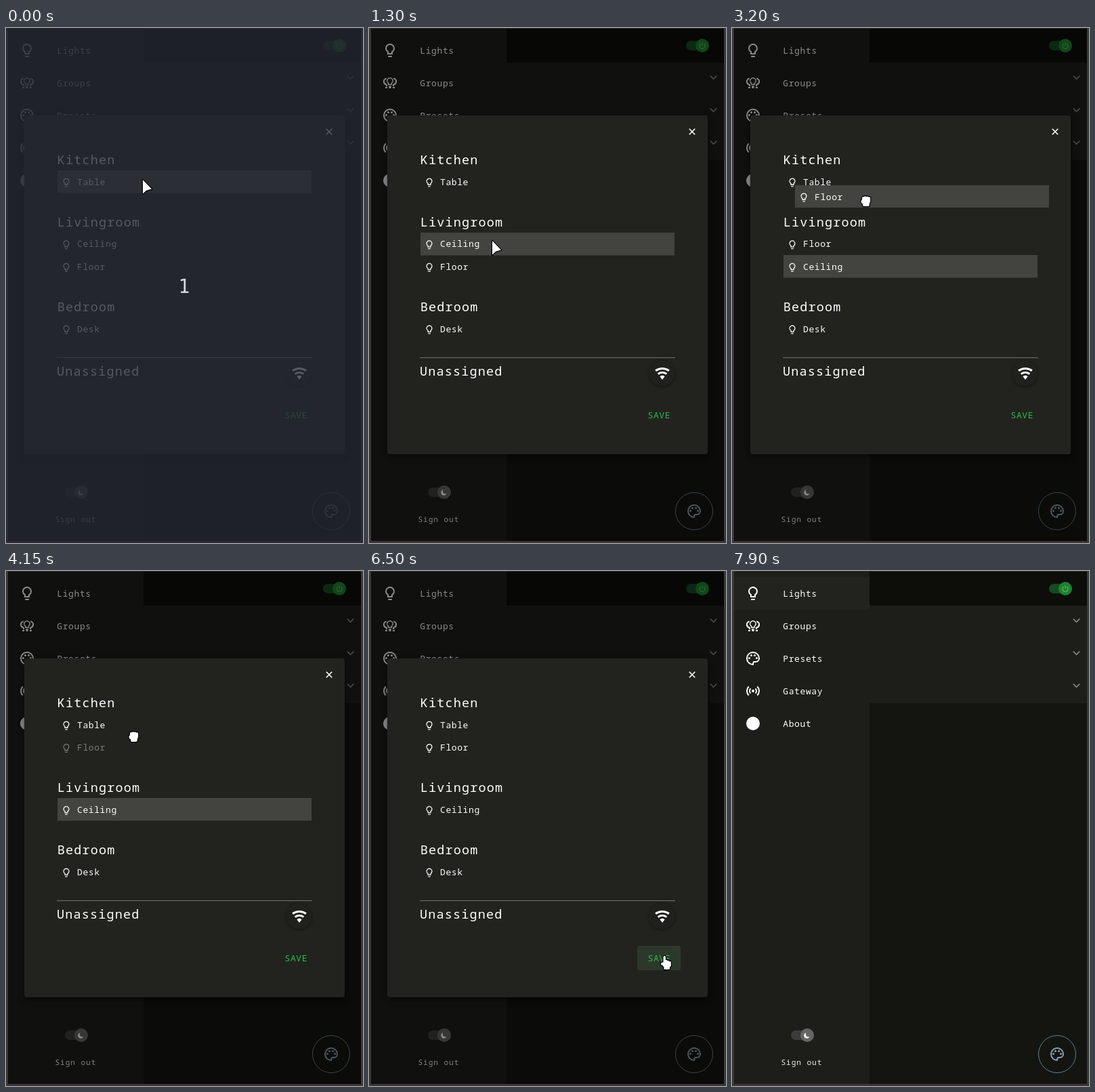
Write an HTML page with a canvas that moves like this. It is 527 px wide and 760 px high and loops after 8550 ms.

```html
<!DOCTYPE html>
<html lang="en">
<head>
<meta charset="utf-8">
<title>Light groups</title>
<style>
  html, body { margin: 0; width: 100%; height: 100%; overflow: hidden; background: #14150f; }
  canvas { display: block; width: 527px; height: 760px; }
</style>
</head>
<body>
<canvas id="stage" width="527" height="760"></canvas>
<script>
const W = 527, H = 760, LOOP = 8550, TICK = 50;
const MONO = '"Noto Sans Mono", "DejaVu Sans Mono", monospace';
const WHITE = '#fff', SIDE = '#1d1e19', PANEL = '#22231f', LIT = '#434440';
const PI = Math.PI;

// Moments of the story, in ms.
const START = 350, GRAB = 2050, LIFT = 2350, SWAP = 2450, MOVE = 3350, DROP = 3950, RELEASE = 5000;
const CLICK = 6550, CLOSE = 6750, EXIT = 7900;

const screen = document.getElementById('stage').getContext('2d');
const layer = document.createElement('canvas');
layer.width = W;
layer.height = H;
const sheet = layer.getContext('2d');
let g = screen;

const ramp = (t, from, span) => Math.max(0, Math.min(1, (t - from) / span));
const linear = p => p;
const smooth = p => p * p * (3 - 2 * p);

// Position on a path of [time, x, y] points.
function along(points, t, curve) {
  const next = points.findIndex(p => t < p[0]);
  if (next < 1) return points.at(next).slice(1);
  const [t0, x0, y0] = points[next - 1], [t1, x1, y1] = points[next];
  const p = curve((t - t0) / (t1 - t0));
  return [x0 + (x1 - x0) * p, y0 + (y1 - y0) * p];
}

function at(x, y, paint, scale = 1, flip = 1) {
  g.save();
  g.translate(x, y);
  g.scale(scale * flip, scale);
  paint();
  g.restore();
}

function rect(x, y, w, h, color, r = 0) {
  g.fillStyle = color;
  g.beginPath();
  g.roundRect(x, y, w, h, r);
  g.fill();
}

function disc(x, y, r, color) {
  g.fillStyle = color;
  g.beginPath();
  g.arc(x, y, r, 0, 2 * PI);
  g.fill();
}

function stroke(color, width, trace) {
  g.strokeStyle = color;
  g.lineWidth = width;
  g.beginPath();
  trace();
  g.stroke();
}

const arc = (x, y, r, mid, half, width, color) =>
  stroke(color, width, () => g.arc(x, y, r, mid - half, mid + half));

function shadowed(blur, drop, paint) {
  g.save();
  g.shadowColor = 'rgba(0,0,0,.45)';
  g.shadowBlur = blur;
  g.shadowOffsetY = drop;
  paint();
  g.restore();
}

function text(s, x, y, color = WHITE, size = 13, gap = 0.6) {
  g.font = `${size}px ${MONO}`;
  g.letterSpacing = gap + 'px';
  g.fillStyle = color;
  g.fillText(s, x, y);
}

const heading = (s, x, y) => text(s, x, y, WHITE, 18.5, 1.15);

// Icons, drawn around their centre on a 24 px grid.
function bulb() {
  stroke(WHITE, 2, () => {
    g.arc(0, -3, 6, PI * 2 / 3, PI / 3);
    g.lineTo(3, 5);
    g.lineTo(-3, 5);
    g.closePath();
  });
  rect(-3, 8, 6, 2, WHITE, 1);
}

function bulbGroup() {
  at(0, -1, bulb, 0.7);
  rect(-1.5, 6, 3, 2, WHITE);
  for (const side of [-1, 1]) {
    at(0, 0, () => {
      arc(4.5, -2, 4.6, 0, 1.4, 2, WHITE);
      rect(4, 2, 2, 3, WHITE);
      rect(4, 6, 3, 2, WHITE);
    }, 1, side);
  }
}

function palette(color) {
  stroke(color, 2, () => {
    g.arc(0, 0, 9, PI / 2, 2 * PI);
    g.arc(4, 0, 5, 0, PI / 2);
    g.arc(2, 6.5, 1.5, -PI / 2, -PI, true);
    g.closePath();
  });
  for (const side of [-1, 1]) {
    disc(side * 2.5, -4.5, 1.5, color);
    disc(side * 5.5, -0.5, 1.5, color);
  }
}

function beacon() {
  disc(0, 0, 2, WHITE);
  for (const mid of [0, PI])
    for (const r of [5, 9]) arc(0, 0, r, mid, 0.8, 2, WHITE);
}

function wifi() {
  const half = Math.atan(3 / 4);
  for (const r of [16.5, 10.5]) arc(0, 9, r, -PI / 2, half, 3, WHITE);
  arc(0, 9, 3, -PI / 2, half, 6, WHITE);
}

const chevron = () => stroke('#858683', 1.7, () => {
  g.moveTo(-4.7, -2.3);
  g.lineTo(0, 2.4);
  g.lineTo(4.7, -2.3);
});

const cross = () => stroke(WHITE, 1.6, () => {
  for (const side of [-4.2, 4.2]) {
    g.moveTo(-4.2, side);
    g.lineTo(4.2, -side);
  }
});

function toggle(track, thumb) {
  rect(-24, -7, 30, 14, track, 7);
  disc(0, 0, 10, thumb);
}

function powerToggle() {
  toggle('#164a22', '#1d832d');
  arc(0, 0.5, 4, PI / 2, 2.5, 1.2, '#5cae69');
  rect(-0.6, -4.5, 1.2, 4.5, '#5cae69');
}

function nightToggle() {
  toggle('#3c3d3a', '#666764');
  disc(-0.5, 0.5, 4.2, WHITE);
  disc(1.8, -1.6, 4, '#666764');
}

function page(t) {
  rect(0, 0, W, H, '#3a3b38');
  rect(0, 757, W, 3, '#3f3539');
  rect(3, 0, 521, 1, '#2b2c28');
  rect(3, 1, 521, 756, '#141511');
  rect(3, 1, 200, 756, SIDE);
  rect(203, 1, 321, 50, '#0d0e0a');
  rect(203, 51, 321, 144, SIDE);
  rect(3, 9, 200, 48, `rgba(255,255,255,${0.025 * ramp(t, 7600, 250)})`);

  const icons = [bulb, bulbGroup, () => palette(WHITE), beacon, () => disc(0, 0, 10, WHITE)];
  ['Lights', 'Groups', 'Presets', 'Gateway', 'About'].forEach((s, i) => {
    at(31, 33 + 48 * i, icons[i]);
    text(s, 75.3, 38 + 48 * i);
  });
  for (let i = 0; i < 3; i++) at(508.5, 73 + 48 * i, chevron);
  at(492, 26, powerToggle);
  at(111, 685, nightToggle);
  text('Sign out', 72.5, 729, '#eee', 11.2, 0.88);

  arc(480, 713, 27.5, 0, PI, 1, '#667f92');
  at(480, 713, () => palette('#8aa3b5'));
}

// Headings and rows flow down from the top of the dialog.
function layout(t) {
  const groups = t < SWAP ? { Kitchen: ['Table'], Livingroom: ['Ceiling', 'Floor'] }
    : t < MOVE ? { Kitchen: ['Table'], Livingroom: ['Floor', 'Ceiling'] }
    : { Kitchen: ['Table', 'Floor'], Livingroom: ['Ceiling'] };
  groups.Bedroom = ['Desk'];

  let y = 201;
  return Object.entries(groups).map(([name, lamps]) => {
    const group = { name, y, rows: lamps.map((lamp, i) => ({ lamp, top: y + 9 + 33.5 * i })) };
    y += 58.3 + 33.5 * lamps.length;
    return group;
  });
}

function row(lamp, x, top) {
  at(x + 13, top + 18, bulb, 0.65);
  text(lamp, x + 29, Math.round(top + 21.5));
}

function saveButton(t) {
  const glow = 0.13 * ramp(t, 6200, 200);
  rect(396, 553, 64, 36, `rgba(110,200,130,${glow})`, 3);
  if (t >= CLICK) {
    g.save();
    g.beginPath();
    g.roundRect(396, 553, 64, 36, 3);
    g.clip();
    disc(436, 568, 10 + 45 * ramp(t, CLICK, 300), `rgba(60,200,90,${0.18 * (1 - ramp(t, CLOSE, 250))})`);
    g.restore();
  }
  text('SAVE', 411.5, 576, '#2abb48');
}

function dialog(t, pointerY) {
  shadowed(10, 4, () => rect(27, 129, 473, 500, PANEL, 4));
  at(477, 153, cross);

  // The hover stays where the drag began until the pointer wakes up again.
  const hoverY = t >= GRAB && t < 4850 ? 350 : pointerY;
  const placed = [0, SWAP, MOVE, DROP].findLast(moment => moment <= t);
  for (const group of layout(t)) {
    heading(group.name, 75.7, Math.round(group.y));
    for (const { lamp, top } of group.rows) {
      if (hoverY >= top && hoverY < top + 33.5) rect(76, Math.round(top), 375, 33.5, LIT);
      g.globalAlpha = lamp === 'Floor' && placed ? ramp(t, placed, 500) : 1;
      row(lamp, 76, top);
      g.globalAlpha = 1;
    }
  }

  rect(75, 486, 377, 1, '#72736f');
  heading('Unassigned', 74.9, 513);
  shadowed(4, 1, () => disc(432.5, 509.5, 19, '#20211d'));
  at(433, 510, wifi);
  saveButton(t);

  if (t >= LIFT && t < DROP) {
    const [x, y] = dragged(t).map(Math.round);
    rect(x, y, 375, 33, LIT);
    row('Floor', x, y);
  }
}

function arrow(path) {
  path.moveTo(1, 1);
  path.lineTo(1, 21.5);
  path.lineTo(6.2, 16.8);
  path.lineTo(14, 14.5);
  path.closePath();
}

function fist(path) {
  for (let i = 0; i < 4; i++) path.roundRect(3 + 2.9 * i, 1 + 0.7 * Math.abs(i - 1.3), 3.4, 8, 1.6);
  path.roundRect(1.6, 6, 13.2, 6, 2.5);
  path.roundRect(4, 8, 9.8, 8, 2);
}

// The hot spot is the tip of the index finger.
function finger(path) {
  path.roundRect(-1.5, 0, 3.4, 13, 1.7);
  for (let i = 1; i < 4; i++) path.roundRect(2.7 * i - 1.3, 5 + i, 3, 8, 1.4);
  path.roundRect(-5, 9.5, 6, 4.5, 2);
  path.roundRect(-2, 9.5, 11.4, 7, 2);
  path.roundRect(-0.6, 12, 8.6, 8, 1.5);
}

const APPROACH = [[START, 201, 223], [1000, 182, 309], [1300, 181, 313], [1450, 181, 313], [1850, 178, 346]];
const DRAG = [[2300, 76, 336], [2500, 73, 316], [2700, 78, 282], [3200, 93, 232], [3650, 84, 221]];
const LEAVE = [[5450, 185, 233], [6350, 436, 568], [7250, 436, 568], [7850, 110, 30]];

const dragged = t => along(DRAG, t, linear);

function pointer(t) {
  if (t < GRAB) return [arrow, ...along(APPROACH, t, linear)];
  if (t < RELEASE) {
    const [x, y] = dragged(t);
    return [fist, x + 96, y + 15];
  }
  const [x, y] = along(LEAVE, t, smooth);
  return [t < 7000 && x > 396 && y > 553 ? finger : arrow, x, y];
}

function drawPointer(shape, x, y) {
  const path = new Path2D();
  shape(path);
  at(Math.round(x), Math.round(y), () => {
    g.lineJoin = 'round';
    g.lineWidth = 2.4;
    g.strokeStyle = '#000';
    g.stroke(path);
    g.fillStyle = WHITE;
    g.fill(path);
  });
}

function countdown() {
  rect(0, 0, W, H, 'rgba(37,40,50,.77)');
  g.textAlign = 'center';
  g.font = '28px "DejaVu Sans Mono", monospace';
  g.letterSpacing = '0px';
  g.fillStyle = '#d7dade';
  g.fillText('1', 263, 391);
  g.textAlign = 'left';
}

function draw(t) {
  const [shape, x, y] = pointer(t);
  page(t);

  const gone = smooth(ramp(t, CLOSE, 350));
  if (gone < 1) {
    rect(3, 1, 521, 756, `rgba(0,0,0,${0.46 * (1 - gone)})`);
    g = sheet;
    g.clearRect(0, 0, W, H);
    dialog(t, y);
    g = screen;
    g.globalAlpha = 1 - gone;
    at(263.5, 379, () => g.drawImage(layer, -263.5, -379), 1 - gone / 2);
    g.globalAlpha = 1;
  }

  if (t < START) countdown();
  if (t < EXIT) drawPointer(shape, x, y);
}

const start = performance.now();
function tick() {
  const t = (performance.now() - start) % LOOP;
  draw(Math.floor(t / TICK) * TICK);
  requestAnimationFrame(tick);
}
tick();
</script>
</body>
</html>
```
